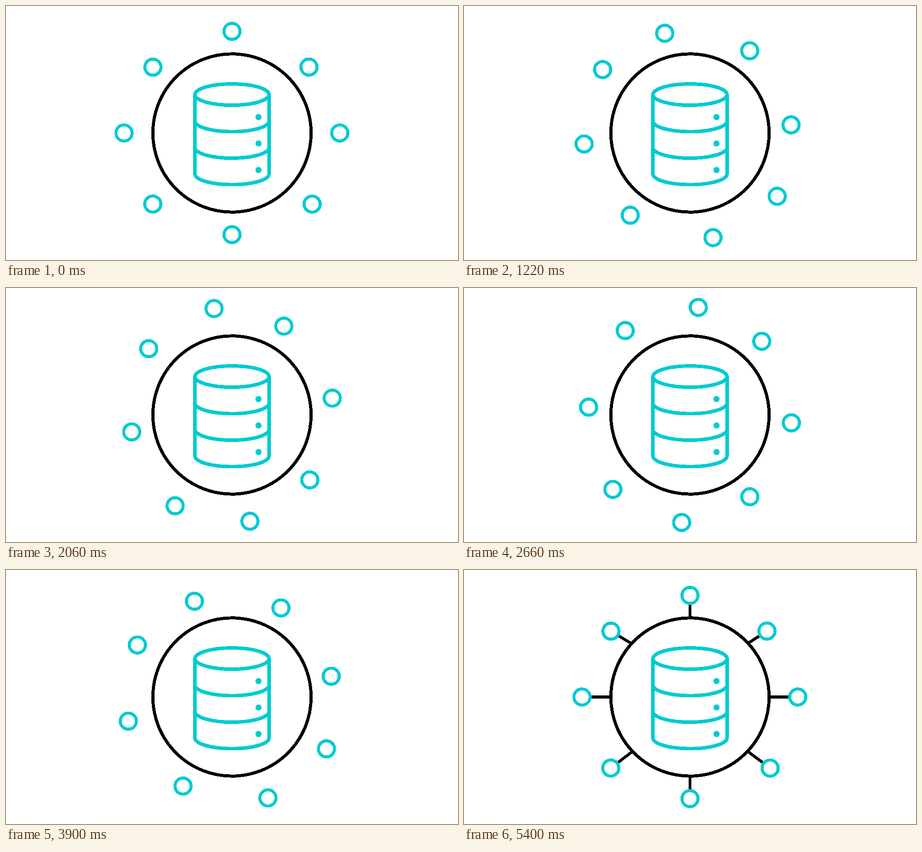
Animation, 998 px wide and 561 px high, one loop 5940 ms. Source, as an HTML page:

```html
<!DOCTYPE html>
<html lang="en">
<head>
<meta charset="utf-8">
<title>Data hub</title>
<style>
  html, body { margin: 0; width: 100%; height: 100%; overflow: hidden; background: #fff; }
  svg { display: block; width: 100%; height: 100%; }
</style>
</head>
<body>
<svg viewBox="0 0 998 561" shape-rendering="crispEdges">
  <g id="spokes" stroke="#05000d" stroke-width="6.4"></g>
  <circle id="ring" fill="none" stroke="#000" stroke-width="6.9"/>
  <g id="drum" fill="none" stroke="#00cbd0" stroke-width="7.8"></g>
  <g id="nodes" fill="#fff" stroke="#00cbd0" stroke-width="6.7"></g>
</svg>
<script>
const LOOP = 5940, STEP = 40;
const CX = 499, CY = 280.5, RING = 174.7, NODE = 17.8;
const SWING_START = 580, SWING_STEPS = 97.6, SWING_RATE = 2.117;
const GROW_START = 4960, GROW_STEPS = 12;

// resting places of the nodes: degrees clockwise from the top, and radius
const angles = [0, 49.4, 90, 131.6, 180, 228.1, 270, 309.8];
const radii = [224.5, 223.8, 238, 236.6, 224.5, 235, 238.4, 227.2];

function polar(deg, r) {
  const a = deg * Math.PI / 180;
  return [CX + r * Math.sin(a), CY - r * Math.cos(a)];
}

function set(el, attrs) {
  for (const key in attrs) el.setAttribute(key, attrs[key]);
}

function add(parentId, tag, attrs) {
  const el = document.createElementNS("http://www.w3.org/2000/svg", tag);
  set(el, attrs);
  return document.getElementById(parentId).appendChild(el);
}

function drawDrum() {
  const rx = 81.8, ry = 23.5, top = 195.6, tier = 58.5;
  const left = CX - rx, right = CX + rx;
  add("drum", "ellipse", { cx: CX, cy: top, rx, ry });
  for (let i = 1; i <= 3; i++) {
    const y = top + tier * i;
    add("drum", "path", { d: `M${left} ${y - tier}V${y}A${rx} ${ry} 0 0 0 ${right} ${y}V${y - tier}` });
    add("drum", "circle", { cx: 557.5, cy: y - 8.9, r: 6.8, fill: "#00cbd0", stroke: "none" });
  }
}

set(document.getElementById("ring"), { cx: CX, cy: CY, r: RING });
drawDrum();

// each spoke leaves the ring halfway between its node's angle and the even spacing
const spokes = angles.map((deg, i) => {
  const [x1, y1] = polar((deg + 45 * i) / 2, RING);
  const [x, y] = polar(deg, radii[i]);
  const reach = 1 - NODE / Math.hypot(x - x1, y - y1);
  const el = add("spokes", "line", { x1, y1 });
  return { el, x1, y1, dx: (x - x1) * reach, dy: (y - y1) * reach };
});
const nodes = angles.map(() => add("nodes", "circle", { r: NODE }));

const stepsSince = (t, start) => Math.max(0, Math.floor((t - start) / STEP) + 1);

// steady swing clockwise, then back at the same rate
function swingAngle(t) {
  const n = stepsSince(t, SWING_START);
  return SWING_RATE * Math.max(0, Math.min(n, SWING_STEPS - n));
}

function render(t) {
  const turn = swingAngle(t);
  const grow = Math.min(1, stepsSince(t, GROW_START) / GROW_STEPS);
  nodes.forEach((el, i) => {
    const [cx, cy] = polar(angles[i] + turn, radii[i]);
    set(el, { cx, cy });
  });
  for (const { el, x1, y1, dx, dy } of spokes) {
    set(el, {
      x2: x1 + dx * grow,
      y2: y1 + dy * grow,
      visibility: grow > 0 ? "visible" : "hidden"
    });
  }
}

const begin = performance.now();
function tick() {
  render((performance.now() - begin) % LOOP);
  requestAnimationFrame(tick);
}
tick();
</script>
</body>
</html>
```
